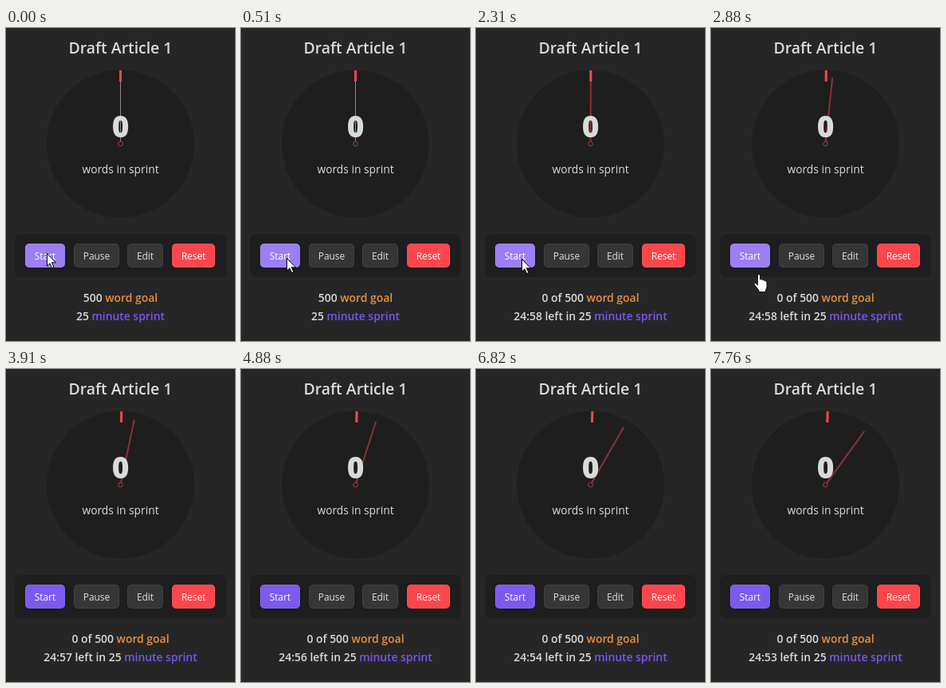
An HTML page that plays this animation: 287x392 px, repeating every 8 s.

```html
<!DOCTYPE html>
<html lang="en">
<head>
<meta charset="utf-8">
<title>Sprint timer</title>
<style>
  html, body { margin: 0; width: 100%; height: 100%; overflow: hidden; background: #262626; }
  svg { display: block; width: 100%; height: 100%; }
  text { font-family: "Open Sans", "Noto Sans", sans-serif; fill: #dadada; text-anchor: middle; }
  .title { font-size: 19.45px; font-weight: 600; }
  .count { font-size: 37px; font-weight: 800; }
  .unit { font-size: 13.8px; font-weight: 500; }
  .button { font-size: 11.9px; }
  .stat { font-size: 13.9px; font-weight: 600; }
  .goal { fill: #ea8f3f; }
  .sprint { fill: #7a55f4; }
  .face { filter: drop-shadow(0 1px 1px rgba(0, 0, 0, .2)); }
  .edge { fill: none; stroke: #fff; stroke-opacity: .06; }
</style>
</head>
<body>
<svg viewBox="0 0 287 392">
  <rect width="287" height="392" fill="#262626"/>
  <text class="title" x="143.5" y="32">Draft Article 1</text>

  <circle cx="143.5" cy="145" r="92.5" fill="#1e1e1e"/>
  <path id="hand" d="M143.5 62V142"/>
  <path id="tick" d="M143.5 53V67" stroke="#fb464c" stroke-width="3"/>
  <circle cx="143.5" cy="145" r="2.8" fill="none" stroke="#b83a40"/>
  <text class="count" x="143.5" y="136.5">0</text>
  <text class="unit" x="143.5" y="182">words in sprint</text>

  <rect x="11" y="258" width="265" height="54" rx="8" fill="#1e1e1e"/>
  <g id="buttons"></g>

  <text class="stat" x="143.5" y="343"><tspan id="words"></tspan> <tspan class="goal">word goal</tspan></text>
  <text class="stat" x="143.5" y="366"><tspan id="time"></tspan> <tspan class="sprint">minute sprint</tspan></text>

  <path id="arrow" d="M.5 .5V16L4 12.7L6.6 18.6L9 17.5L6.4 11.8H11.5Z" fill="#fff" stroke="#000"/>
  <path id="pointer" fill="#fff" stroke="#000" stroke-width=".8"
    d="M5 2Q5 .5 6.5 .5T8 2V7Q10.5 5.800 11 7.700Q13 6.800 13.6 8.700Q16.500 8 16.500 11V16Q16.500 18 15 20V22.500H6.500V20.500L1 13.500Q0 11.500 2 11.300L5 14Z"/>
</svg>
<script>
const LOOP = 8000;
const TURN = 500;                 // duration of one hand step
const SECOND_STARTS = [1370, 2310, 3310, 4340, 5310, 6250, 7220];
const LEAVE = 3000;               // cursor leaves the stage

// [time, x, y, shape]
const CURSOR = [
  [0, 51, 282, 'arrow'], [120, 51, 279, 'arrow'], [250, 50, 277, 'arrow'],
  [380, 54, 283, 'arrow'], [510, 57, 288, 'arrow'], [1070, 57, 289, 'arrow'],
  [2740, 54, 299, 'pointer'], [2880, 53.5, 308, 'pointer'], [LEAVE, 0, 0, 'none'],
];

const $ = id => document.getElementById(id);
const set = (el, attrs) => Object.entries(attrs).forEach(([k, v]) => el.setAttribute(k, v));

// [label, x, width, face colour, label colour]
const BUTTONS = [
  ['Start', 24, 50, '#7c5aed', '#fff'], ['Pause', 85, 57, '#363636', '#e2e2e2'],
  ['Edit', 152, 45, '#363636', '#e2e2e2'], ['Reset', 208, 54, '#fb464c', '#fff'],
];
$('buttons').innerHTML = BUTTONS.map(([label, x, width, face, ink]) => `
  <rect class="face" x="${x}" y="270" width="${width}" height="30" rx="5" fill="${face}"/>
  <rect class="edge" x="${x + 0.5}" y="270.5" width="${width - 1}" height="29" rx="4.5"/>
  <text class="button" x="${x + width / 2}" y="290" style="fill:${ink}">${label}</text>`).join('');
const startButton = $('buttons').querySelector('.face');

const easeInOut = p => p * p * (3 - 2 * p);
const clamp = p => Math.min(1, Math.max(0, p));

function draw(t) {
  const elapsed = SECOND_STARTS.filter(start => t >= start).length;
  const running = elapsed > 0;

  // The tick moves from the first second on, the hand from the next one.
  const steps = SECOND_STARTS.map(start => easeInOut(clamp((t - start + 60) / TURN)));
  const turned = steps.reduce((sum, step) => sum + step, 0);
  set($('hand'), {
    transform: `rotate(${(turned - steps[0]) * 6} 143.5 145)`,
    stroke: running ? '#8c3237' : '#8a8a8a',
    'stroke-width': running ? 2 : 1,
  });
  set($('tick'), { transform: `rotate(${turned * 0.24} 143.5 145)` });

  $('words').textContent = running ? '0 of 500' : '500';
  $('time').textContent = running ? `24:${60 - elapsed} left in 25` : '25';
  set(startButton, { fill: t < LEAVE ? '#9b7ff3' : '#7c5aed' });

  const [, x, y, shape] = CURSOR.findLast(([time]) => t >= time);
  for (const id of ['arrow', 'pointer']) {
    set($(id), { transform: `translate(${x} ${y})`, visibility: id === shape ? 'visible' : 'hidden' });
  }
}

const origin = performance.now();
function frame() {
  draw((performance.now() - origin) % LOOP);
  requestAnimationFrame(frame);
}
frame();
</script>
</body>
</html>
```
